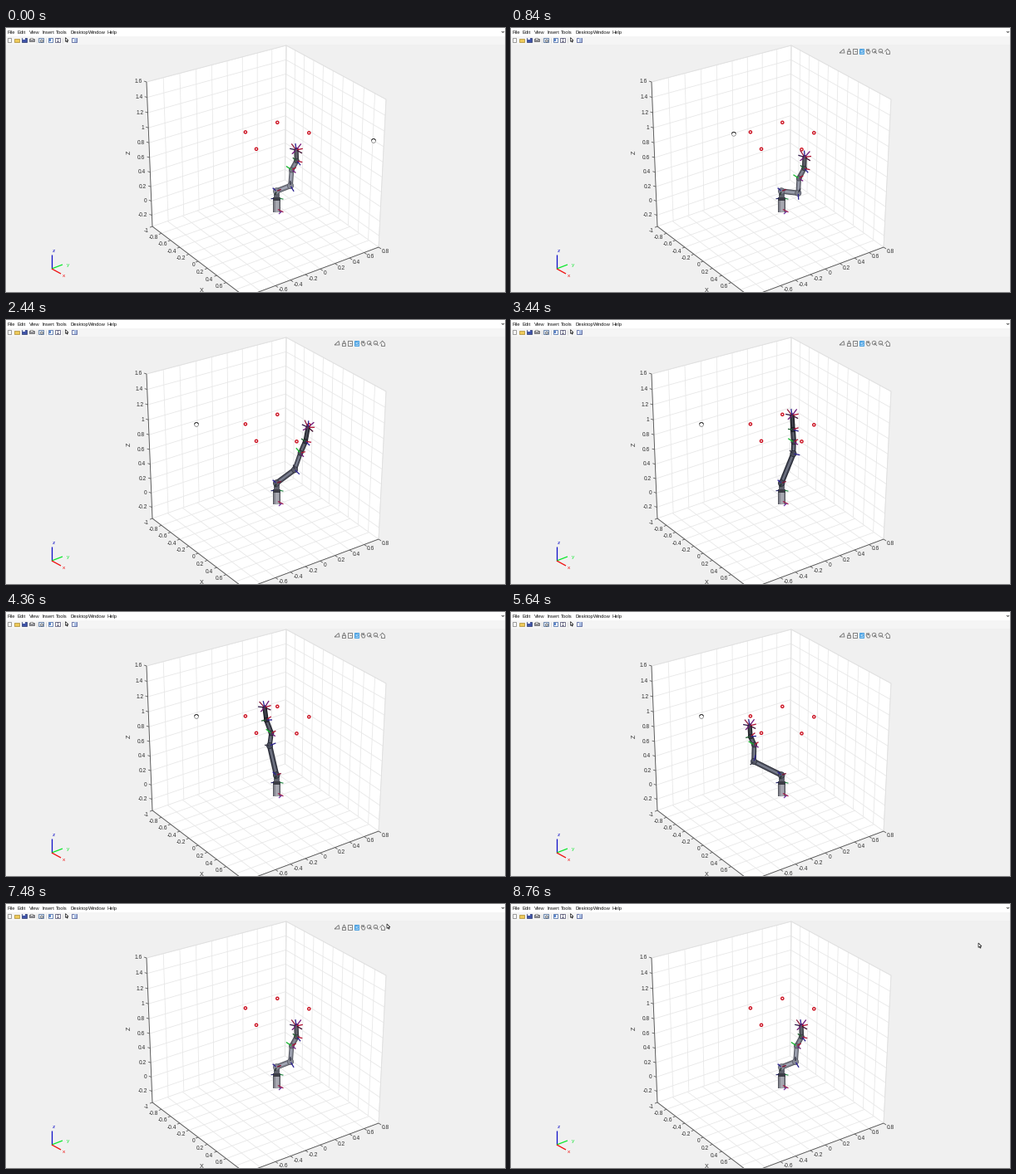
Animation of 600 by 318 pixels, one loop 8.92 s. Source, as a matplotlib script:

```python
import numpy as np
import matplotlib.pyplot as plt
from matplotlib.animation import FuncAnimation
from matplotlib.collections import LineCollection
from matplotlib.patches import Circle, Polygon, Rectangle

W, H, DPI = 600, 318, 100
STEP, LOOP = 40, 8920
PX = 72 / DPI
INK = "#303030"

plt.rcParams["font.family"] = "Liberation Sans"
fig = plt.figure(figsize=(W / DPI, H / DPI), dpi=DPI, facecolor="#f0f0f0")
ax = fig.add_axes([0, 0, 1, 1])
ax.set(xlim=(0, W), ylim=(H, 0))
ax.axis("off")


def segs(lines, color, width=1.0, z=2, **kw):
    widths = np.atleast_1d(width) * PX
    lc = LineCollection(lines, colors=color, linewidths=widths, zorder=z, **kw)
    ax.add_collection(lc, autolim=False)
    return lc


def label(x, y, s, size=6.6, color=INK, **kw):
    kw = {"ha": "center", "va": "center", **kw}
    return ax.text(x, y, s, fontsize=size * PX, color=color, **kw)


def box(x, y, w, h, fill, edge="none", width=0.7, z=2):
    return ax.add_patch(Rectangle((x, y), w, h, fc=fill, ec=edge, lw=width * PX, zorder=z))


def homography(quad):
    """Map the unit square (00, 10, 11, 01) onto four screen corners."""
    rows, rhs = [], []
    for (u, v), (x, y) in zip([(0, 0), (1, 0), (1, 1), (0, 1)], quad):
        rows += [[u, v, 1, 0, 0, 0, -u * x, -v * x],
                 [0, 0, 0, u, v, 1, -u * y, -v * y]]
        rhs += [x, y]
    m = np.append(np.linalg.solve(rows, rhs), 1).reshape(3, 3)

    def project(u, v):
        x, y, w = m @ (u, v, 1)
        return np.array([x / w, y / w])
    return project


# --- plot box -------------------------------------------------------------
TL, TB, TR = (169, 65), (337, 21), (457, 86)
BL, BB, BR, BF = (176, 239), (335.5, 183), (448, 264), (287.5, 324)
xs = np.linspace(-1, 1, 11)
ys = np.linspace(-1, 0.8, 10)
zs = np.linspace(-0.2, 1.6, 10)
U, V, Q = (xs + 1) / 2, (ys + 1) / 1.8, (zs + 0.36) / 1.96


def wall(quad, us, vs):
    ax.add_patch(Polygon(quad, fc="white", ec="none", zorder=1))
    f = homography(quad)
    grid = [(f(u, 0), f(u, 1)) for u in us] + [(f(0, v), f(1, v)) for v in vs]
    segs(grid, "#e7e7e7", 0.8)
    return f


left = wall([BL, BB, TB, TL], 1 - V, Q)
right = wall([BB, BR, TR, TB], U, Q)
floor = wall([BL, BF, BR, BB], U, V)
segs([(TL, TB), (TB, TR), (TR, BR), (TB, BB)], "#e0e0e0", 0.8)
segs([(TL, BL), (BL, BF), (BF, BR)], "#555555", 0.9, 3)


def tick(p, d, value, off, ha):
    segs([(p, p + d)], "#555555", 0.8, 3)
    label(*(p + off), f"{round(value, 1) + 0:g}", ha=ha)


for z, q in zip(zs, Q):
    tick(left(0, q), (-3, -1), z, (-5.2, 0), "right")
for x, u in zip(xs[:9], U):
    tick(floor(u, 0), (-3, 1.2), x, (-4, 5), "right")
for y, v in zip(ys[2:], V[2:]):
    tick(floor(1, v), (3, 2), y, (3.5, 5.5), "left")
label(148, 150, "Z", 7.2, rotation=90)
label(235, 317, "X", 7.2)

# --- orientation triad ----------------------------------------------------
for end, pos, name, color in [((55, 273), (57, 268), "z", "#1010c8"),
                              ((68, 285), (75, 285), "y", "#10e830"),
                              ((66, 296), (70, 299), "x", "#f01010")]:
    segs([((55, 290), end)], color, 1.3)
    label(*pos, name, 6.5, color)

# --- menu and toolbar -----------------------------------------------------
box(0, 0, W, 10, "#ffffff", z=1)
box(0, 10, W, 10, "#f5f5f5", z=1)
for x, s in zip([2, 14, 28, 43, 60, 77, 99, 121],
                "File Edit View Insert Tools Desktop Window Help".split()):
    label(x, 5.2, s, 5.9, "#111111", ha="left")
segs([[(596, 4), (597.5, 5.5), (599, 4)]], INK, 0.8)

box(2.4, 11.6, 4, 5.6, "#ffffff", "#777777")
box(9.5, 12.8, 6, 4.2, "#edc95a", "#a88a30")
box(19.2, 11.8, 5.4, 5.4, "#4054a8", "#28386c")
box(20.4, 12, 3, 2, "#e8ecf8")
box(28, 13.4, 5.6, 3, "#9a9aa2", "#555555")
box(29.2, 11.6, 3.2, 2, "#ffffff", "#777777")
box(39, 12, 5.6, 4.6, "#dbe7f7", "#40608c")
ax.add_patch(Circle((43, 15.6), 1.4, fc="#f4f4f4", ec="#444444", lw=0.5, zorder=3))
box(51, 11.8, 4.6, 5.4, "#ffffff", "#335a9c")
box(52.4, 12.8, 1.8, 3.4, "#5a86cc")
box(59.2, 11.8, 5.4, 5.4, "#ffffff", "#444466")
segs([((60.5, y), (63.4, y)) for y in (13.2, 14.6, 16)], "#333355", 0.7)
box(79, 11.8, 5.8, 5.2, "#ffffff", "#334488")
box(82.3, 12.2, 2.2, 4.4, "#a8bce0")
segs([((x, 11.5), (x, 17.5)) for x in (36.5, 47.5, 67.5)], "#cfcfcf", 0.7)

ARROW = np.array([(0, 0), (0, 5.4), (1.3, 4.3), (2.2, 6.2), (3, 5.8),
                  (2.2, 4), (3.9, 3.9)])
ax.add_patch(Polygon(ARROW * 0.9 + (71.5, 11.6), fc="white", ec="#111111", lw=0.5, zorder=3))

# --- axes tool strip ------------------------------------------------------
GRAY, BLUE = "#777777", "#3f9be0"
strip = [
    segs([[(395, 30), (400, 25.5), (401, 30), (395, 30)],
          [(404.2, 31), (404.2, 28), (408, 28), (408, 31), (404.2, 31)],
          [(405, 28), (406.5, 25), (408, 28)],
          [(411.2, 25.2), (416.4, 25.2), (416.4, 31), (411.2, 31), (411.2, 25.2)],
          [(412.5, 28), (415.2, 28)],
          [(427, 28), (428.6, 31), (431, 31), (432, 27.6)],
          [(427, 28), (428, 25.4), (429.4, 28), (430, 25.2), (431, 28)],
          [(435.6, 27.6), (437.6, 27.6)], [(436.6, 26.6), (436.6, 28.6)],
          [(438.3, 29.3), (440, 31)],
          [(443.4, 27.6), (445.4, 27.6)], [(446.1, 29.3), (447.8, 31)],
          [(449.5, 28.4), (452.6, 25.2), (455.7, 28.4)],
          [(450.5, 28), (450.5, 31), (454.7, 31), (454.7, 28)]], GRAY, 0.9, 5),
    box(418.8, 25.4, 5.4, 5.4, "#a9d4f5", BLUE, 0.9, 5),
    ax.add_patch(Circle((421.5, 28.1), 1.7, fc="none", ec=BLUE, lw=0.6, zorder=6)),
]
for x in (436.6, 444.4):
    strip.append(ax.add_patch(Circle((x, 27.6), 2.3, fc="none", ec=GRAY, lw=0.6, zorder=5)))

# --- waypoints ------------------------------------------------------------
for p in [(349.5, 146.3), (364.3, 126.3), (326.3, 113.8), (287.9, 125.4), (301, 145.8)]:
    ax.add_patch(Circle(p, 1.6, fc="white", ec="#cc1020", lw=1.35 * PX, zorder=4))

# --- robot arm ------------------------------------------------------------
# elbow, lower wrist, upper wrist, tool, brightness
HOME = [342, 190, 343.5, 171, 349.5, 160, 349, 147, 1]
KEYS = [(0, HOME), (350, HOME),
        (1520, [351, 210, 352, 194, 359, 180, 361.5, 165, .5]),
        (2450, [347, 180, 354, 160, 360, 146, 363, 129, .3]),
        (3440, [339.5, 161, 340, 147, 339, 132, 338, 115, .05]),
        (4360, [317, 161, 319, 146, 313, 130, 311, 115, .1]),
        (5640, [292, 180, 292.5, 160, 288, 150, 287, 137, .25]),
        (6400, [303, 193, 301, 175, 302, 163, 301, 148, .5]),
        (7480, HOME), (LOOP, HOME)]
T = np.array([k for k, _ in KEYS], float)
P = np.array([p for _, p in KEYS], float)
M = np.gradient(P, T, axis=0)
M[[0, 1, -2, -1]] = 0


def pose(t):
    i = min(np.searchsorted(T, t, "right") - 1, len(T) - 2)
    h = T[i + 1] - T[i]
    s = (t - T[i]) / h
    v = ((1 + 2 * s) * (1 - s) ** 2 * P[i] + s * (1 - s) ** 2 * h * M[i]
         + s * s * (3 - 2 * s) * P[i + 1] + s * s * (s - 1) * h * M[i + 1])
    return v[:8].reshape(4, 2), np.clip(v[8], 0, 1)


SHOULDER = np.array([325.2, 196.5])
for x, w, c in [(321.3, 8.4, "#55565e"), (322.2, 6.8, "#85868f"), (324.2, 3.4, "#a6a7b0")]:
    box(x, 207, w, 14.5, c, z=6)
box(321.2, 203.5, 8.6, 4, "#3c3d46", z=6)
box(321.8, 195, 7.4, 8.5, "#5f616c", z=6)
segs([((327, 218.5), (333.5, 221.8)), ((328, 224), (331.5, 221))],
     ["#a01848", "#7030a0"], 1.2, 8)
segs([((329.5, 205.3), (333.5, 206.2)), ((318.5, 205.8), (322, 205.2))],
     ["#188038", "#202060"], 1.1, 8)

WIDTHS = np.array([6.4, 5.6, 6, 5.4])
shells = [segs([], "k", WIDTHS * k, 7, capstyle="round") for k in (1, .68, .25)]
joints = ax.scatter([0] * 4, [0] * 4, s=(np.array([7.6, 7.2, 6, 5.6]) * PX) ** 2,
                    lw=0.5, zorder=7.5)
RED, GREEN, NAVY, PURPLE = "#b01030", "#18b830", "#2a2090", "#701878"
# joint, angle from the link, reach, colour
AXES = [(0, 50, 6, NAVY), (0, -70, 6, "#801030"), (0, 160, 5, "#203028"),
        (1, -80, 8, NAVY), (1, 70, 6, "#303040"),
        (2, 60, 8, GREEN), (2, -55, 6, RED), (2, -120, 6, PURPLE),
        (3, -75, 7, RED), (3, 80, 6, "#206030"), (3, -110, 7, NAVY),
        (4, 35, 9.5, "#902040"), (4, 5, 8, NAVY), (4, -40, 9.5, PURPLE),
        (4, -80, 8, RED), (4, 75, 8, "#301848"), (4, -120, 8, "#401030"),
        (4, 130, 7, PURPLE)]
rods = segs([], [a[3] for a in AXES], 1.3, 9)


def draw_arm(t):
    pts, light = pose(t)
    chain = np.vstack([SHOULDER, pts])
    links = np.stack([chain[:-1], chain[1:]], axis=1)
    tones = [np.array(lo) + light * np.array(gain) for lo, gain in
             [((.12, .13, .17), (.22, .22, .22)),
              ((.27, .28, .34), (.26, .26, .25)),
              ((.44, .46, .52), (.22, .22, .22))]]
    fade = np.array([1, 1, .85, .6])[:, None]
    for shell, tone in zip(shells, tones):
        shell.set_segments(links)
        shell.set_color(tone * fade)
    joints.set_offsets(chain[:4])
    joints.set_facecolor(tones[1] * fade)
    joints.set_edgecolor(tones[0] * fade)
    step = np.diff(chain, axis=0)
    heading = np.arctan2(step[:, 1], step[:, 0])
    lines = []
    for j, angle, reach, _ in AXES:
        a = (heading[j - 1] if j else -np.pi / 2) - np.radians(angle)
        d = np.array([np.cos(a), np.sin(a)])
        lines.append((chain[j] + d, chain[j] + d * reach))
    rods.set_segments(lines)


# --- pointer --------------------------------------------------------------
PATH = [(0, 442, 136), (200, 442, 136), (1080, 229, 126), (6880, 229, 126),
        (7400, 458, 24), (7520, 458, 24), (8120, 567, 47), (8520, 562, 47), (LOOP, 562, 47)]
hand = [ax.add_patch(Circle((0, 0), 2.4, fc="white", ec="#777777", lw=0.5, zorder=11)),
        segs([], "#222222", 0.9, 12)]
arrow = ax.add_patch(Polygon(ARROW, fc="white", ec="#222222", lw=0.55, zorder=12))
ARC = np.array([(-2.6, -.6), (-1.6, -2), (0, -2.5), (1.6, -2), (2.5, -.6)])


def draw_pointer(t):
    for (t0, *a), (t1, *b) in zip(PATH, PATH[1:]):
        if t0 <= t < t1:
            s = (t - t0) / (t1 - t0)
            s = s * s * (3 - 2 * s)
            p = np.array(a) + s * (np.array(b) - a)
            break
    turning = t < 7320
    for h in hand:
        h.set_visible(turning)
    arrow.set_visible(not turning)
    hand[0].center = tuple(p)
    hand[1].set_segments([ARC + p])
    arrow.set_xy(ARROW + p)


def update(i):
    t = i * STEP
    draw_arm(t)
    draw_pointer(t)
    for s in strip:
        s.set_visible(200 <= t < 8040)
    return []


anim = FuncAnimation(fig, update, frames=LOOP // STEP, interval=STEP,
                     repeat=True, repeat_delay=0)
plt.show()
```
